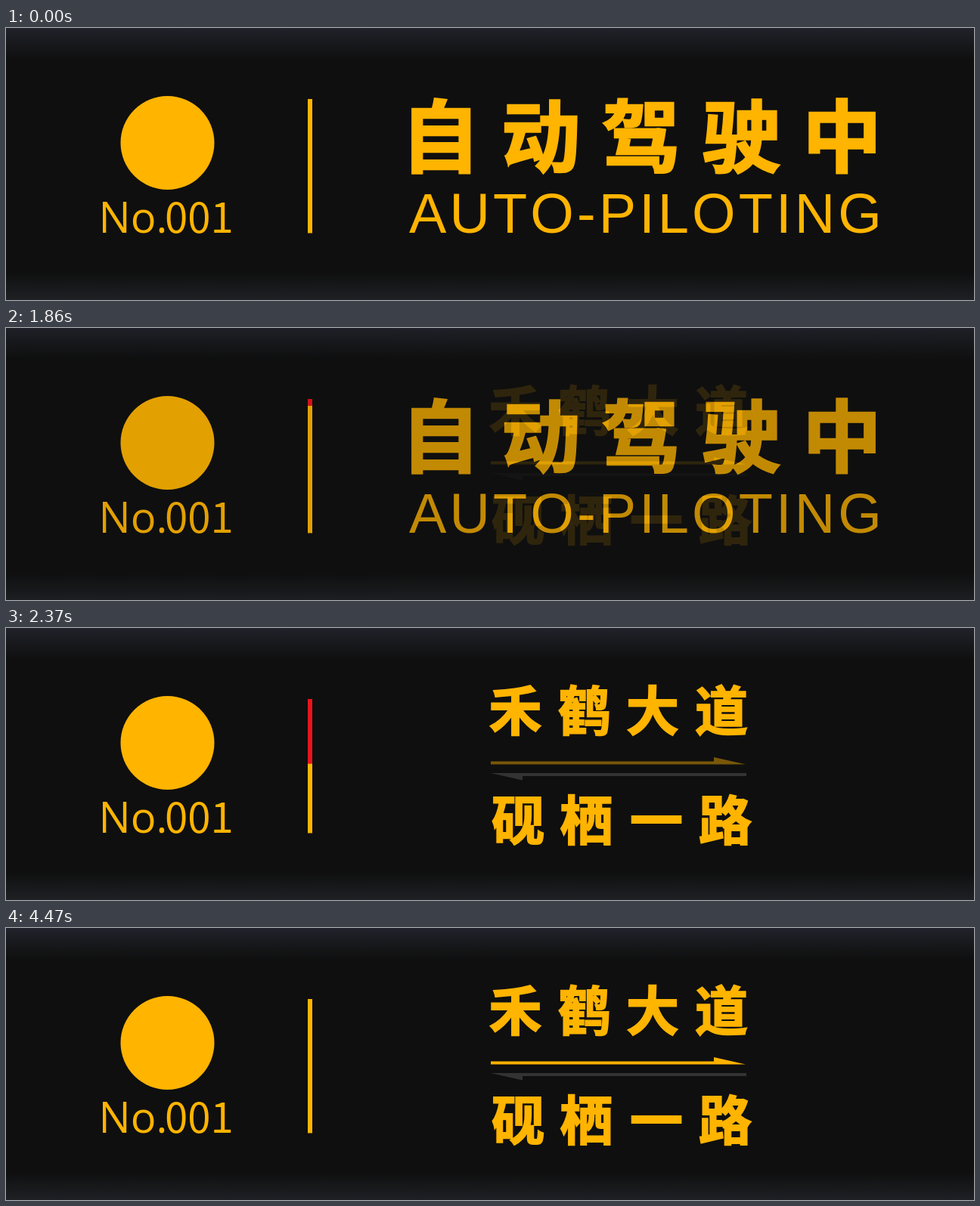
Write an HTML page that moves like this. It is 1280 by 360 pixels and loops after 4.5 s.

```html
<!DOCTYPE html>
<html lang="zh-CN">
<head>
<meta charset="utf-8">
<title>Auto-piloting sign</title>
<style>
  html, body { margin: 0; width: 100%; height: 100%; overflow: hidden; background: #0f0f0f; }
  svg { display: block; width: 100vw; height: 100vh; }
  text { font-family: "Noto Sans CJK SC", "Noto Sans CJK", sans-serif; }
  .han { font-weight: 900; text-anchor: middle; stroke: #ffb400; stroke-width: .026em; }
  .label { font-family: "Open Sans", "Noto Sans", sans-serif; }
  .latin { font-family: "Liberation Sans", Arial, sans-serif; font-kerning: none; letter-spacing: 4.1px; }
  .mix { isolation: isolate; }
  .mix > g { mix-blend-mode: plus-lighter; }
</style>
</head>
<body>
<svg viewBox="0 0 1280 360" fill="#ffb400">
  <defs>
    <linearGradient id="glow" x2="0" y2="1">
      <stop offset="0" stop-color="#21222b"/>
      <stop offset=".05" stop-color="#191a1e"/>
      <stop offset=".115" stop-color="#0f0f0f"/>
      <stop offset=".9" stop-color="#0f0f0f"/>
      <stop offset=".95" stop-color="#17181a"/>
      <stop offset="1" stop-color="#1f2025"/>
    </linearGradient>
  </defs>

  <g id="common">
    <rect width="1280" height="360" fill="url(#glow)"/>
    <circle cx="213.5" cy="152" r="62"/>
    <text class="label" x="122.5" y="271" font-size="56">No.</text>
    <text x="210" y="271" font-size="54.5">001</text>
    <rect x="399" y="94" width="6" height="177.5"/>
    <rect id="runner" x="399" width="6" fill="#e9141d"/>
  </g>

  <g class="mix">
    <g id="status">
      <text class="han" font-size="104" x="574.5 707.2 840 972.5 1105.5" y="183">自动驾驶中</text>
      <text class="latin" font-size="74" x="533" y="271">AUTO-PILOTING</text>
    </g>
    <g id="route">
      <text class="han" font-size="70" x="673.5 765 855 946" y="135.6">禾鹤大道</text>
      <path id="ahead" d="M641 176.5H936V171L978 180.5H641Z"/>
      <path d="M979 192H641L683 201.5V196H979Z" fill="#333"/>
      <text class="han" font-size="70" x="677 767.5 860 951" y="281">砚栖一路</text>
    </g>
  </g>
</svg>
<script>
  const LOOP = 4500, STEP = 30, TOP = 94, BOTTOM = 271.5, LENGTH = 93, SWEEP = 1800;
  const $ = id => document.getElementById(id);
  const clamp = (v, lo, hi) => Math.min(hi, Math.max(lo, v));
  const ramp = (t, from, to) => clamp((t - from) / (to - from), 0, 1);
  const fade = (id, alpha) => { $(id).style.opacity = alpha; };

  // The red runner climbs through the divider, then comes back down.
  function moveRunner(t) {
    const travel = BOTTOM - TOP + LENGTH;
    const head = t < SWEEP
      ? BOTTOM - travel * t / SWEEP
      : TOP - LENGTH + travel * (t - SWEEP) / SWEEP;
    const y = clamp(head, TOP, BOTTOM);
    $("runner").setAttribute("y", y);
    $("runner").setAttribute("height", clamp(head + LENGTH, TOP, BOTTOM) - y);
  }

  function draw(now) {
    const t = Math.floor(now % LOOP / STEP) * STEP;
    const status = 1 - ramp(t, 1770, 2130);
    const route = ramp(t, 1800, 2250);
    fade("status", status);
    fade("route", route);
    fade("common", Math.min(1, status + route));
    fade("ahead", 0.665 + 0.335 * Math.cos(2 * Math.PI * t / 900));
    moveRunner(t);
  }

  const start = performance.now();
  function tick() {
    draw(performance.now() - start);
    requestAnimationFrame(tick);
  }
  tick();
</script>
</body>
</html>
```
